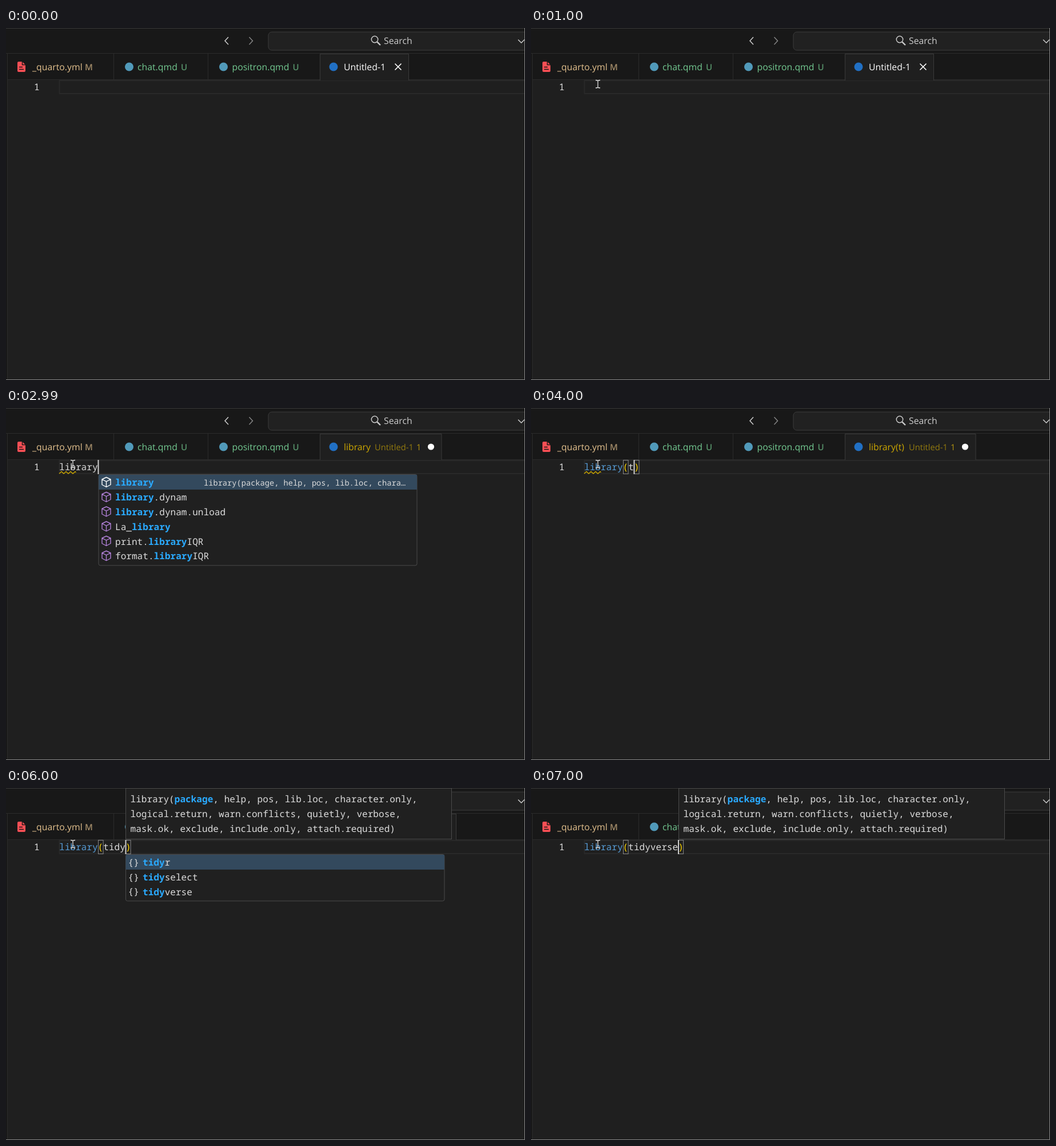
Write an HTML page that moves like this. It is 908 px wide and 617 px high and loops after 8000 ms.

```html
<!DOCTYPE html>
<html lang="en">
<head>
<meta charset="utf-8">
<title>Editor autocomplete</title>
<style>
html, body { margin: 0; width: 100%; height: 100%; overflow: hidden; background: #1f1f1f; }
svg { display: block; width: 100vw; height: 100vh; }
text { white-space: pre; text-rendering: geometricPrecision; }
.ui { font: 15.8px "Open Sans", "Noto Sans", sans-serif; }
.mark { font-size: 15px; font-weight: 600; }
.code { font: 500 16.1px "Noto Sans Mono", monospace; fill: #dcdcdc; }
.small { font-size: 13.7px; }
.hit { font-weight: 600; fill: #2aaaff; }
.fn { fill: #569cd6; }
.br { fill: #ffd700; font-weight: 400; }
.line { fill: none; stroke: #2b2b2b; }
.match { fill: none; stroke: #888; }
.box { fill: #202020; stroke: #4a4a4a; }
.row { fill: #33495d; }
.caret { fill: #d0d0d0; }
.wave { fill: none; stroke: #cca700; stroke-width: 1.4; }
.tab { fill: #1f1f1f; stroke: #3a3a3a; }
.warn { fill: #cca700; }
.dim { fill: #937a0e; font-size: 14.7px; }

/* scenes cut hard from one to the next */
.s { opacity: 0; animation: 8s step-end infinite; }
.empty { animation-name: empty; }
.word { animation-name: word; }
.letter { animation-name: letter; }
.tidy { animation-name: tidy; }
.hints { animation-name: hints; }
.call { animation-name: call; }
.done { animation-name: done; }
.mouse { animation-name: mouse; }
@keyframes empty { 0% { opacity: 1 } 37.375%, to { opacity: 0 } }
@keyframes word { 0% { opacity: 0 } 37.375% { opacity: 1 } 50%, to { opacity: 0 } }
@keyframes letter { 0% { opacity: 0 } 50% { opacity: 1 } 62.5%, to { opacity: 0 } }
@keyframes tidy { 0% { opacity: 0 } 62.5% { opacity: 1 } 75%, to { opacity: 0 } }
@keyframes hints { 0% { opacity: 0 } 75% { opacity: 1 } 87.5%, to { opacity: 0 } }
@keyframes call { 0% { opacity: 0 } 62.5% { opacity: 1 } 87.5%, to { opacity: 0 } }
@keyframes done { 0% { opacity: 0 } 87.5%, to { opacity: 1 } }
@keyframes mouse { 0% { opacity: 0 } 12.5%, to { opacity: 1 } }
</style>
</head>
<body>
<svg viewBox="0 0 908 617" preserveAspectRatio="none">
  <defs>
    <path id="wave" class="wave" d="M93 115l4-3.5 4 3.5 4-3.5 4 3.5 4-3.5 4 3.5 4-3.5 1.5 1.5"/>
    <rect id="match" class="match" x=".5" y="91.5" width="8.6" height="24"/>
    <rect id="caret" class="caret" y="91" width="2" height="25"/>
    <path id="cube" fill="none" stroke-width="1.4" stroke-linejoin="round"
      d="M0-8.5L7.5-5V4.5L0 8.5L-7.5 4.5V-5ZM-7.5-5L0-1.2L7.5-5M0-1.2V8.5"/>
    <g id="status" class="ui warn">
      <text class="dim" x="645" y="74">Untitled-1</text>
      <text x="718" y="74" font-size="14.7" fill="#b29310">1</text>
      <circle cx="743.5" cy="68" r="5.6" fill="#fff"/>
    </g>
    <g id="signature">
      <rect class="box" x="209.5" y=".5" width="570" height="89"/>
      <g class="code">
        <text x="217.5" y="24.5">library(<tspan class="hit">package</tspan>, help, pos, lib.loc, character.only,</text>
        <text x="217.5" y="50.5">logical.return, warn.conflicts, quietly, verbose,</text>
        <text x="217.5" y="76.5">mask.ok, exclude, include.only, attach.required)</text>
      </g>
    </g>
  </defs>

  <!-- window -->
  <rect width="908" height="617" fill="#1f1f1f"/>
  <path d="M0 0H908V90H0ZM0 90H2V617H0Z" fill="#181818"/>
  <path class="line" d="M0 44.5H908M2.5 44V617M2 90.5H908M188.5 45V90M353.5 45V90"/>
  <path d="M0 .5H908" stroke="#383838"/>
  <rect x="459" y="7" width="470" height="32" rx="6" fill="#212121" stroke="#3c3c3c"/>
  <g fill="none" stroke="#ccc" stroke-width="1.5">
    <path d="M389 16L383 22.5L389 29"/>
    <path d="M425.5 16L431.5 22.5L425.5 29" stroke="#858585"/>
    <path d="M896 20.5L901.5 26L907 20.5"/>
    <circle cx="645" cy="20" r="5.7"/>
    <path d="M649.3 24.3L655 30" stroke-width="2.4"/>
  </g>
  <text class="ui" x="661" y="28" fill="#ccc">Search</text>

  <!-- resting tabs -->
  <path d="M20 61q0-2 2-2h6.5l5.5 5.5v10.5q0 2-2 2h-10q-2 0-2-2z" fill="#fa4f55"/>
  <path d="M28.5 59v5.5h5.5M23 68.5h6M23 72.5h8" fill="none" stroke="#181818" stroke-width="1.5"/>
  <g class="ui">
    <text x="46" y="74" fill="#e2c08d">_quarto.yml</text>
    <text class="mark" x="138" y="74" fill="#a38c69">M</text>
    <g fill="#73c991">
      <text x="230" y="74">chat.qmd</text>
      <text x="395.5" y="74">positron.qmd</text>
    </g>
    <g class="mark" fill="#569169">
      <text x="306" y="74">U</text>
      <text x="501.5" y="74">U</text>
    </g>
  </g>
  <g fill="#519aba">
    <circle cx="215.5" cy="68" r="7.5"/>
    <circle cx="380.5" cy="68" r="7.5"/>
  </g>

  <!-- current line -->
  <path d="M908 92H93.5V115H908" fill="none" stroke="#292929" stroke-width="2"/>
  <text class="code" x="49" y="108.5">1</text>

  <!-- active tab: width follows its label -->
  <path class="tab s empty" d="M549.5 92V45.5H704.5V92"/>
  <path class="tab s word" d="M549.5 91V45.5H762V91"/>
  <path class="tab s letter" d="M549.5 91V45.5H778V91"/>
  <path class="tab s tidy" d="M549.5 91V45.5H800.5V91"/>
  <path class="tab s hints" d="M549.5 91V45.5H787.5V91"/>
  <circle cx="573" cy="68" r="7.5" fill="#2170c4"/>

  <g class="s empty">
    <text class="ui" x="591" y="74" fill="#fff">Untitled-1</text>
    <path d="M680.5 62.5l11 11m0-11l-11 11" stroke="#fff" stroke-width="1.6"/>
  </g>

  <g class="s word">
    <text class="ui warn" x="591" y="74">library</text>
    <use href="#status"/>
    <text class="code" x="93" y="108.5">library</text>
    <use href="#wave"/>
    <use href="#caret" x="160.5"/>
    <rect class="box" x="162" y="116.5" width="557" height="159.5" rx="3"/>
    <rect class="row" x="162" y="117" width="557" height="26"/>
    <use href="#cube" x="175.5" y="130" stroke="#fff"/>
    <g stroke="#b180d7">
      <use href="#cube" x="175.5" y="156"/>
      <use href="#cube" x="175.5" y="181.5"/>
      <use href="#cube" x="175.5" y="207.5"/>
      <use href="#cube" x="175.5" y="233"/>
      <use href="#cube" x="175.5" y="259"/>
    </g>
    <g class="code">
      <text x="191" y="136" class="hit">library</text>
      <text x="346" y="135.5" class="small">library(package, help, pos, lib.loc, chara…</text>
      <text x="191" y="162"><tspan class="hit">library</tspan>.dynam</text>
      <text x="191" y="187.5"><tspan class="hit">library</tspan>.dynam.unload</text>
      <text x="191" y="213.5">La_<tspan class="hit">library</tspan></text>
      <text x="191" y="239.5">print.<tspan class="hit">library</tspan>IQR</text>
      <text x="191" y="265">format.<tspan class="hit">library</tspan>IQR</text>
    </g>
  </g>

  <g class="s letter">
    <text class="ui warn" x="591" y="74">library(t)</text>
    <use href="#status" x="16"/>
    <use href="#wave"/>
    <use href="#match" x="161"/><use href="#match" x="180"/>
    <text class="code" x="93" y="108.5"><tspan class="fn">library</tspan><tspan class="br">(</tspan>t<tspan class="br">)</tspan></text>
    <use href="#caret" x="179.5"/>
  </g>

  <g class="s tidy">
    <text class="ui warn" x="591" y="74">library(tidy)</text>
    <use href="#status" x="38"/>
    <use href="#wave"/>
  </g>

  <g class="s call">
    <use href="#match" x="161"/><use href="#match" x="209"/>
    <text class="code" x="93" y="108.5"><tspan class="fn">library</tspan><tspan class="br">(</tspan>tidy<tspan class="br">)</tspan></text>
    <use href="#caret" x="208.5"/>
  </g>

  <g class="s hints">
    <use href="#signature"/>
    <rect class="box" x="209.5" y="116.5" width="557.5" height="81.5" rx="3"/>
    <rect class="row" x="209.5" y="117" width="557.5" height="26"/>
    <g class="code">
      <text x="213.5" y="135.5">{}</text><text x="239" y="136"><tspan class="hit">tidy</tspan>r</text>
      <text x="213.5" y="161.5">{}</text><text x="239" y="162"><tspan class="hit">tidy</tspan>select</text>
      <text x="213.5" y="187">{}</text><text x="239" y="187.5"><tspan class="hit">tidy</tspan>verse</text>
    </g>
  </g>

  <g class="s done">
    <use href="#match" x="161"/><use href="#match" x="257.5"/>
    <text class="code" x="93" y="108.5"><tspan class="fn">library</tspan><tspan class="br">(</tspan>tidyverse<tspan class="br">)</tspan></text>
    <use href="#caret" x="257"/>
    <use href="#signature" x="49"/>
  </g>

  <path class="s mouse" d="M113 91.5q3 0 4 1q1-1 4-1M117 92.5V104M113 105q3 0 4-1q1 1 4 1" fill="none" stroke="#ddd" stroke-width="1.3"/>
  <path d="M907.5 0V616.5H0" fill="none" stroke="#8a8a8a"/>
</svg>
</body>
</html>
```
